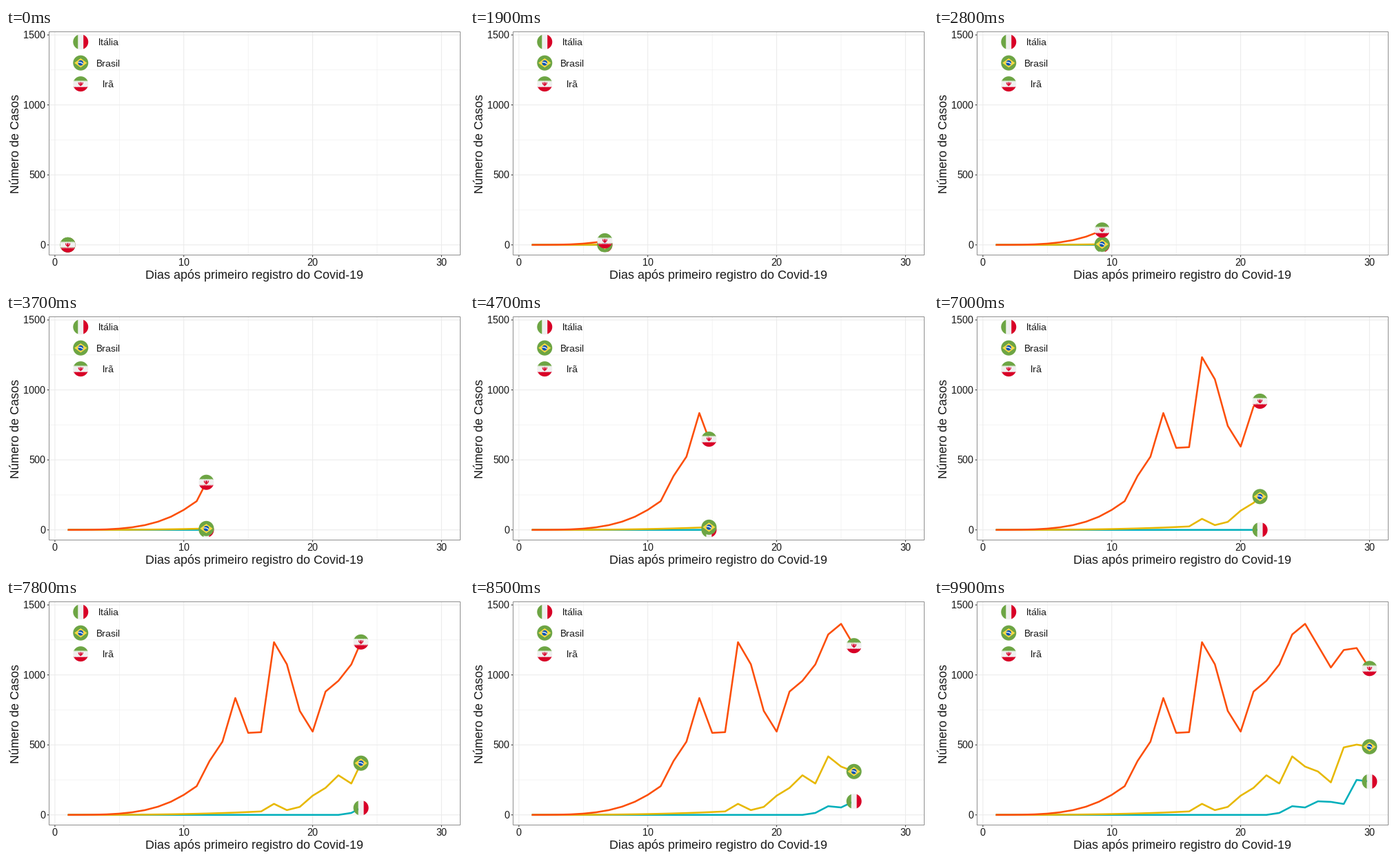
Animation of 664x373 px, one loop 10000 ms. Source, as a matplotlib script:

```python
import numpy as np
import matplotlib.pyplot as plt
from matplotlib.animation import FuncAnimation
from matplotlib.patches import Circle, Polygon, Rectangle
from matplotlib.transforms import Affine2D

W, H, DPI = 664, 373, 64
PT = 72 / DPI  # points per pixel
FRAMES, STEP = 100, 100
LEFT, RIGHT, TOP, BOTTOM = 62.5, 658.5, 5.5, 329.5
R = 11

GREEN, RED, WHITE = "#6DA544", "#D80027", "#F0F0F0"
YELLOW, BLUE = "#FFDA44", "#0052B4"
GRID, INK = "#EBEBEB", "#1a1a1a"

days = np.arange(1, 31)
# each day is reached on a whole frame
keys = np.round((days - 1) * (FRAMES - 1) / 29)


def outbreak(scale, power, recent):
    """Power-law growth at first, then the swings of the recent days."""
    early = days[:len(days) - len(recent)]
    return np.append(scale * early ** power, recent)


italy = outbreak(0, 1, [14, 62, 53, 97, 93, 78, 250, 238])
brazil = outbreak(0.006, 3, [79, 34, 57, 137, 193, 283, 224, 418, 345, 310,
                             232, 482, 502, 487])
iran = outbreak(0.0143, 4, [205, 385, 523, 835, 586, 591, 1234, 1076, 743, 595,
                            881, 958, 1075, 1289, 1365, 1209, 1053, 1178, 1192,
                            1046])

plt.rcParams.update({"font.family": "Liberation Sans",
                     "text.hinting": "default", "text.hinting_factor": 1})
fig = plt.figure(figsize=(W / DPI, H / DPI), dpi=DPI, facecolor="white")
ax = fig.add_axes([0, 0, 1, 1])
ax.set_xlim(0, W)
ax.set_ylim(H, 0)
ax.axis("off")


def px(day):
    return LEFT + (np.asarray(day) + 0.45) * (RIGHT - LEFT) / 31.9


def py(cases):
    return BOTTOM - (np.asarray(cases) + 72.5) * (BOTTOM - TOP) / 1595


def stroke(x, y, color, width, **kw):
    kw = {"solid_capstyle": "butt", "solid_joinstyle": "round", **kw}
    return ax.plot(x, y, color=color, lw=width * PT, snap=False, **kw)[0]


def label(x, y, text, size, **kw):
    ax.text(x, y, text, size=size * PT, color=INK, va="baseline", **kw)


def draw_axes():
    # every second grid line is a labelled major one
    for i in range(7):
        x, y = px(5 * i), py(250 * i)
        major = i % 2 == 0
        width = 1.07 if major else 0.53
        stroke([x, x], [TOP, BOTTOM], GRID, width, zorder=1)
        stroke([LEFT, RIGHT], [y, y], GRID, width, zorder=1)
        if major:
            stroke([x, x], [BOTTOM, BOTTOM + 2.75], "#333333", 1.07)
            stroke([LEFT - 2.75, LEFT], [y, y], "#333333", 1.07)
            label(x, 345.3, str(5 * i), 15, ha="center")
            label(57.5, y + 5.2, str(250 * i), 15, ha="right")
    ax.add_patch(Rectangle((LEFT, TOP), RIGHT - LEFT, BOTTOM - TOP, fill=False,
                           ec="#8f8f8f", lw=PT, zorder=9, snap=False))
    label(360.5, 364.3, "Dias após primeiro registro do Covid-19", 18, ha="center")
    label(19, 167.5, "Número de Casos", 18, ha="center", rotation=90,
          rotation_mode="anchor")


def italy_flag(add, line, ring):
    x = ring[:, 0]
    add(Polygon(ring[np.abs(x) <= 3.9], fc=WHITE))
    add(Polygon(ring[x <= -3.8], fc=GREEN))
    add(Polygon(-ring[x <= -3.8], fc=RED))


def brazil_flag(add, line, ring):
    add(Circle((0, 0), R, fc=GREEN))
    add(Polygon([(-9.1, 0), (0, -6.7), (9.1, 0), (0, 6.7)], fc=YELLOW))
    add(Circle((0, 0), 3.83, fc=BLUE))
    a = np.linspace(0, np.pi, 120)
    x, y = -1.9 + 6.45 * np.cos(a), 5.5 - 6.45 * np.sin(a)
    inside = np.hypot(x, y) < 3.83
    line(x[inside], y[inside], WHITE, 1.4)


def iran_flag(add, line, ring):
    y = ring[:, 1]
    add(Polygon(ring[np.abs(y) <= 3.9], fc=WHITE))
    add(Polygon(ring[y >= 3.8], fc=RED))
    add(Polygon(-ring[y >= 3.8], fc=GREEN))
    for edge in (-4.3, 4.3):
        line([-9.5, 9.5], [edge, edge], WHITE, 1.1, dashes=(1.3, 0.8),
             dash_capstyle="butt")
    a = np.linspace(0, np.pi, 30)
    for w in (3.2, 1.5):
        line(w * np.cos(a), -2.3 + 4.2 * np.sin(a), RED, 0.95)
    line([0, 0], [-2.6, 3], RED, 1.2)


def make_flag(design, z):
    """Build a round flag at the origin; returns the transform that places it."""
    place = Affine2D()
    where = place + ax.transData
    a = np.linspace(0, 2 * np.pi, 241)
    ring = R * np.column_stack([np.cos(a), np.sin(a)])

    def add(patch):
        patch.set(transform=where, zorder=z, linewidth=0)
        ax.add_patch(patch)

    def line(x, y, color, width, **kw):
        stroke(x, y, color, width, transform=where, zorder=z, **kw)

    design(add, line, ring)
    return place


draw_axes()

series = []
for i, (name, cases, color, design) in enumerate([
        ("Itália", italy, "#00AFBB", italy_flag),
        ("Brasil", brazil, "#E7B800", brazil_flag),
        ("Irã", iran, "#FC4E07", iran_flag)]):
    y = py(1450 - 150 * i)
    make_flag(design, 4).translate(px(2), y)
    label(148.4, y + 5.1, name, 14.23, ha="center")
    path = stroke([], [], color, 2.56, zorder=3 + 0.1 * i)
    series.append((cases, path, make_flag(design, 5 + i)))


def update(frame):
    day = np.interp(frame, keys, days)
    past = days[keys < frame]
    x = px(np.append(past, day))
    for cases, path, place in series:
        y = py(np.append(cases[:len(past)], np.interp(day, days, cases)))
        path.set_data(x, y)
        place.clear().translate(x[-1], y[-1])
    return [path for _, path, _ in series]


anim = FuncAnimation(fig, update, frames=FRAMES, interval=STEP, repeat=True,
                     repeat_delay=0, blit=False)
plt.show()
```
